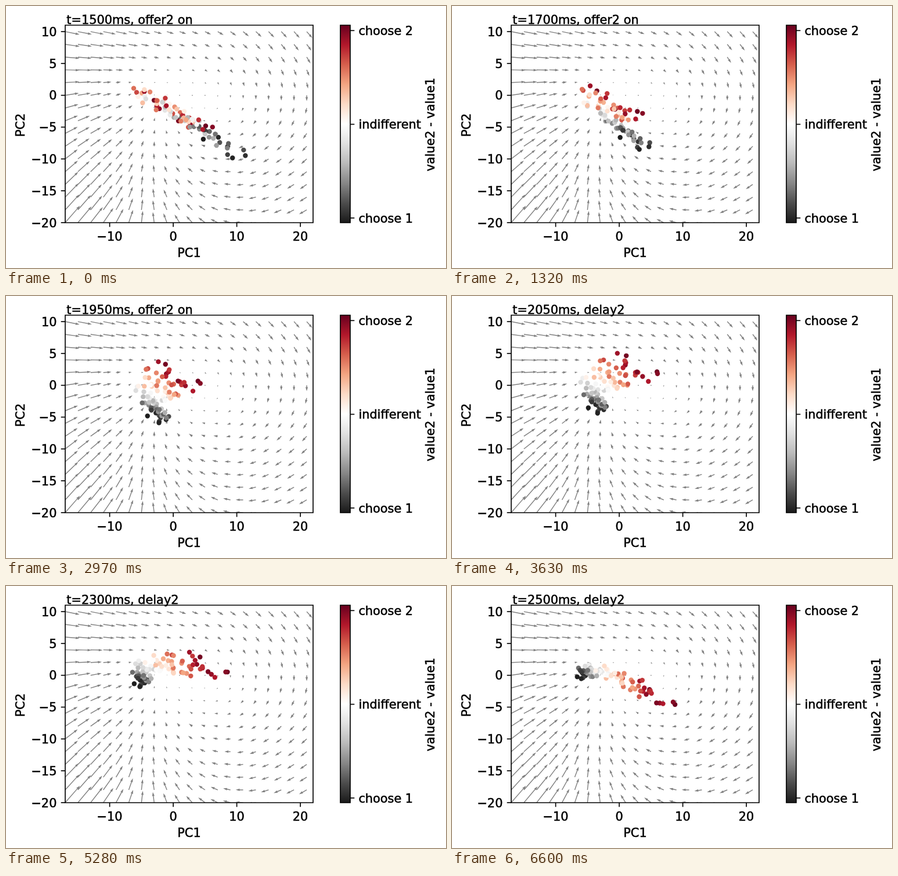
An HTML page for the animation above (7.92 s loop, 758x451 px).

```html
<!DOCTYPE html>
<html lang="en">
<head>
<meta charset="utf-8">
<title>Phase plane</title>
<style>
  html, body { margin: 0; width: 100%; height: 100%; overflow: hidden; background: #fff; }
  svg { display: block; width: 758px; height: 451px; }
  text { font: 20.83px "DejaVu Sans", sans-serif; stroke: #000; stroke-width: .55px; }
  .line { fill: none; stroke: #000; stroke-width: 1.67px; }
  .end { text-anchor: end; }
  .mid { text-anchor: middle; }
</style>
</head>
<body>
<svg viewBox="0 0 758 451">
  <defs>
    <clipPath id="inside"><path d="M102 33H529V373H102Z"/></clipPath>
    <linearGradient id="scale" x1="0" y1="1" x2="0" y2="0"></linearGradient>
  </defs>
  <g clip-path="url(#inside)">
    <path id="arrows" fill="#808080"/>
    <g id="dots"></g>
  </g>
  <rect x="576" y="33" width="17" height="340" fill="url(#scale)"/>
  <path class="line" d="M102 33H529V373H102ZM576 33H593V373H576Z"/>
  <g id="axes"></g>
  <text id="title" x="104.3" y="31"></text>
</svg>
<script>
const STEP = 330, LOOP = 7920, LAST = 20, DOTS = 88;
const $ = id => document.getElementById(id);
const px = x => 288.1 + x * 10.95;
const py = y => 153.7 - y * 10.96;
const { exp, tanh } = Math;

function add(parent, tag, attrs, text) {
  const el = document.createElementNS("http://www.w3.org/2000/svg", tag);
  for (const key in attrs) el.setAttribute(key, attrs[key]);
  if (text) el.textContent = text;
  parent.appendChild(el);
  return el;
}

// Colours from "choose 1" to "choose 2"
const palette = ["1a1a1a", "4d4d4d", "878787", "bababa", "e0e0e0", "ffffff",
                 "fddbc7", "f4a582", "d6604d", "b2182b", "67001f"];
palette.forEach((hex, i) => add($("scale"), "stop", { offset: i / 10, "stop-color": "#" + hex }));

function colour(c) {
  const i = Math.min(9, Math.floor(c * 10)), f = c * 10 - i;
  const part = (hex, j) => parseInt(hex.slice(j, j + 2), 16);
  const mix = j => Math.round(part(palette[i], j) * (1 - f) + part(palette[i + 1], j) * f);
  return `rgb(${mix(0)},${mix(2)},${mix(4)})`;
}

// Axes and labels
function label(x, y, text, cls = "", turned = false) {
  add($("axes"), "text", { x, y, class: cls, ...(turned && { transform: `rotate(-90 ${x} ${y})` }) }, text);
}
const tick = d => add($("axes"), "path", { class: "line", d });
const minus = v => String(v).replace("-", "\u2212");

for (let v = -10; v <= 20; v += 10) {
  tick(`M${px(v)} 373v7.3`);
  label(px(v), 403.6, minus(v), "mid");
}
for (let v = -20; v <= 10; v += 5) {
  tick(`M102 ${py(v)}h-7.3`);
  label(87.4, py(v) + 7.6, minus(v), "end");
}
["choose 2", "indifferent", "choose 1"].forEach((text, i) => {
  const y = 42.3 + i * 161.3;
  tick(`M593 ${y}h7.3`);
  label(607.4, y + 7.7, text);
});
label(315.5, 432, "PC1", "mid");
label(32, 205, "PC2", "mid", true);
label(738, 204, "value2 - value1", "mid", true);

// Flow in pixels: a clockwise swirl on the right, a push from the left
const sigmoid = z => 1 / (1 + exp(-z));
function flow(x, y) {
  const notch = exp(-(((y - 2) / 5) ** 2));
  const push = (25 - .87 * y) * sigmoid((-7 - 4 * notch - x) / (4 - 2 * notch));
  const lift = (y - 3) * (y > 3 ? .85 : 1.55) * sigmoid((-2 - x) / 10);
  return [15 * tanh(y / 13) + push, 11 * sigmoid((x - 9) / 4) + lift];
}

function arrow(x, y) {
  const [dx, dy] = flow(x, y);
  const length = Math.hypot(dx, dy), w = 1.43;
  if (length < w) return `M${px(x) - .7} ${py(y) - .7}h1.4v1.4h-1.4Z`;
  const k = Math.min(1, length / (5 * w)) * w;
  const at = (a, b) => `${px(x) + (dx * a - dy * b) / length} ${py(y) + (dy * a + dx * b) / length}`;
  const neck = length - 4.5 * k, back = length - 5 * k;
  return "M" + [at(0, -k / 2), at(neck, -k / 2), at(back, -1.5 * k), at(length, 0),
                at(back, 1.5 * k), at(neck, k / 2), at(0, k / 2)].join("L") + "Z";
}
let shape = "";
for (let y = -20; y <= 10; y += 2)
  for (let x = -17; x <= 21; x += 2) shape += arrow(x, y);
$("arrows").setAttribute("d", shape);

// Paths of the cloud centre for choice 1, indifferent and choice 2
const paths = [
  [[393, 251], [287, 228], [242, 181], [225, 156]],
  [[285, 180], [260, 182], [254, 139], [261, 149]],
  [[300, 189], [282, 152], [348, 114], [361, 195]]];

// Smooth curve through evenly spaced points, s from 0 to 1
function along(points, s, axis) {
  const n = points.length - 1, i = Math.min(n - 1, Math.floor(s * n)), f = s * n - i;
  const p = j => points[Math.max(0, Math.min(n, j))][axis];
  const a = p(i), b = p(i + 1);
  const m0 = i ? (b - p(i - 1)) / 2 : b - a;
  const m1 = i < n - 1 ? (p(i + 2) - a) / 2 : b - a;
  return a + f * (m0 + f * (3 * (b - a) - 2 * m0 - m1 + f * (2 * (a - b) + m0 + m1)));
}

function centre(c, s, axis) {
  const [low, mid, high] = paths.map(points => along(points, s, axis));
  const d = 2 * c - 1;
  return mid + d * (high - low) / 2 + d * d * ((high + low) / 2 - mid);
}

let seed = 7;
function random() {
  seed = (seed * 16807) % 2147483647;
  return seed / 2147483647;
}

const dots = Array.from({ length: DOTS }, (_, i) => {
  const rank = i * 37 % DOTS, c = (rank + .5) / DOTS;
  return {
    c,
    u: 2 * (rank * .618034 % 1) - 1,
    jx: 2 * random() - 1,
    jy: 2 * random() - 1,
    el: add($("dots"), "circle", { r: 4.2, fill: colour(c) })
  };
});

// The cloud starts as a long streak and contracts, more so for choice 1
function place({ c, u, jx, jy, el }, step) {
  const shrink = exp(-step / 9);
  const jitter = 4 + 8 * c + 5 * shrink * (1 - c);
  const halfX = 42 * shrink + 22 * c;
  const halfY = 28 * shrink * (1 - .4 * c) + 14 * c;
  el.setAttribute("cx", centre(c, step / LAST, 0) + u * halfX + jx * jitter);
  el.setAttribute("cy", centre(c, step / LAST, 1) + u * halfY + jy * jitter);
}

let shown = -1;
const start = performance.now();
function draw() {
  const elapsed = Math.max(0, performance.now() - start) % LOOP;
  const step = Math.min(LAST, Math.floor(elapsed / STEP));
  if (step !== shown) {
    shown = step;
    const time = 1500 + 50 * step;
    $("title").textContent = `t=${time}ms, ${time < 2000 ? "offer2 on" : "delay2"}`;
    dots.forEach(dot => place(dot, step));
  }
  requestAnimationFrame(draw);
}
draw();
</script>
</body>
</html>
```
